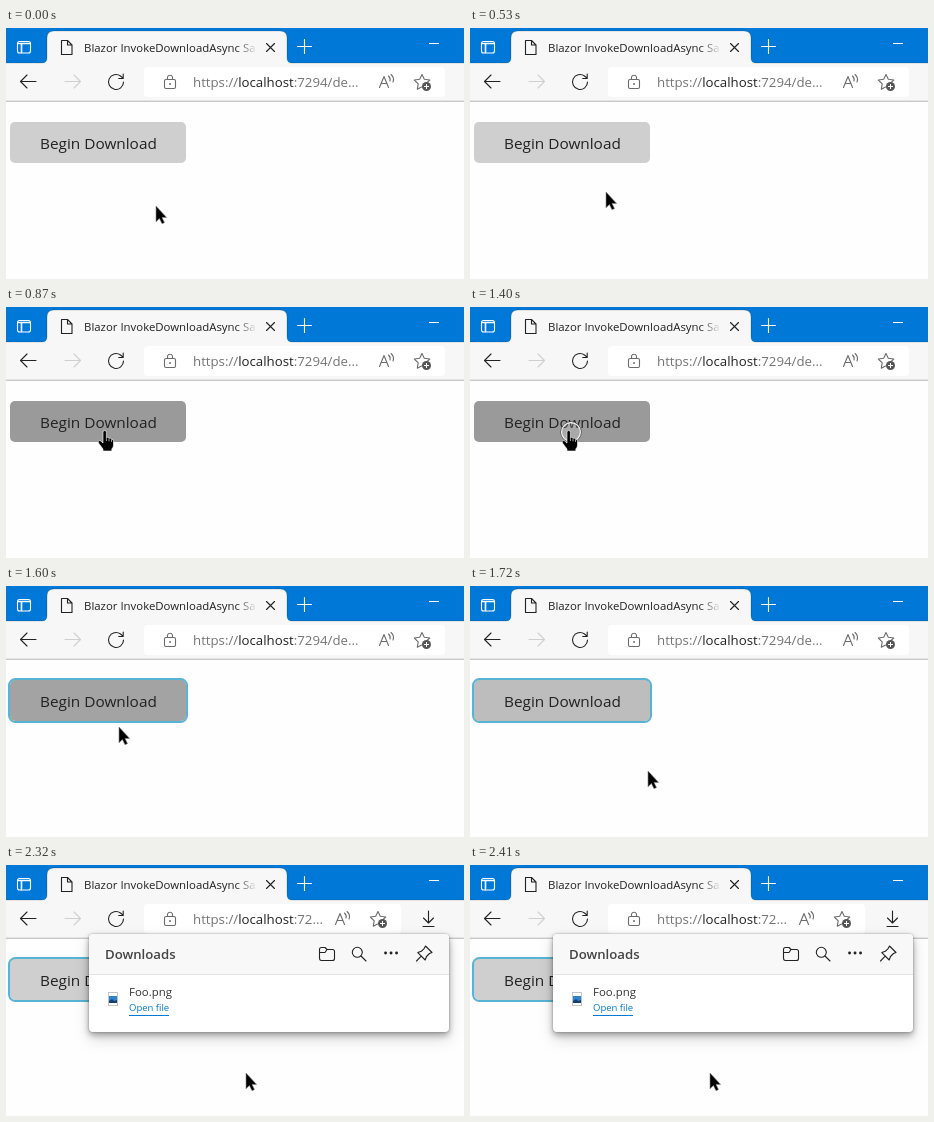
These frames come from a looping animation (458x251 px, 4340 ms). An HTML page:

```html
<!DOCTYPE html>
<html lang="en">
<head>
<meta charset="utf-8">
<title>Download demo</title>
<style>
html, body { margin: 0; width: 100%; height: 100%; overflow: hidden; background: #fefefe; }
svg { display: block; width: 458px; height: 251px; }
text { font-family: "Open Sans", "Noto Sans", sans-serif; fill: #222; white-space: pre; }
.line { fill: none; stroke: #222; stroke-width: 1.1; stroke-linecap: round; stroke-linejoin: round; }
.soft { stroke: #6b6b6b; }
.light { stroke: #fff; }
.pale { stroke: #cfcfcf; }
#panel { filter: drop-shadow(0 0 1px rgba(0,0,0,.3)) drop-shadow(0 3px 3px rgba(0,0,0,.3)) drop-shadow(0 6px 7px rgba(0,0,0,.15)); }
</style>
</head>
<body>
<svg viewBox="0 0 458 251">
  <defs>
    <linearGradient id="fade">
      <stop offset="0" stop-color="#f7f7f7" stop-opacity="0"/>
      <stop offset="1" stop-color="#f7f7f7"/>
    </linearGradient>
  </defs>
  <rect width="458" height="251" fill="#fefefe"/>

  <!-- Page -->
  <rect id="button" x="4" y="94" width="176" height="41" rx="5"/>
  <rect id="ring" x="3" y="93" width="178" height="43" rx="6.5" fill="none" stroke="#58b4d4" stroke-width="2"/>
  <text x="34" y="121" font-size="15.35">Begin Download</text>

  <!-- Title bar and toolbar -->
  <rect width="458" height="36" fill="#0078d7"/>
  <path d="M-2 35H36Q41 35 41 30V10Q41 3 48 3H274Q281 3 281 10V30Q281 35 286 35H460V73H-2Z" fill="#f7f7f7" stroke="#000" stroke-opacity=".16"/>
  <rect y="73" width="458" height="1" fill="#c8c8c8"/>
  <rect class="line light" x="11.5" y="13.5" width="13" height="11.5" rx="2"/>
  <path class="line light" d="M12 15.5H24M15.5 15.5V24.5" style="stroke-width:1.6"/>
  <path class="line" d="M55.5 12.5H61.5L66 17V26.5H55.5ZM61.5 12.5V17H66"/>
  <text x="78" y="23.5" font-size="11.4">Blazor InvokeDownloadAsync Sa</text>
  <rect x="230" y="8" width="21" height="22" fill="url(#fade)"/>
  <path class="line" d="M260.5 15.5L268.5 23.5M268.5 15.5L260.5 23.5"/>
  <path class="line light" d="M291.5 18.5H305.5M298.5 11.5V25.5"/>
  <path d="M423 15.5H433" stroke="#fff"/>

  <path class="line" d="M30 53.5H14.5M21 47L14.5 53.5L21 60"/>
  <path class="line pale" d="M59 53.5H74.5M68 47L74.5 53.5L68 60"/>
  <path class="line" d="M117.5 54A7.5 7.5 0 1 1 114.5 48L117 50.2M117.2 46V50.5H112.7"/>
  <rect id="field" x="138" y="39" height="30" rx="4" fill="#fff"/>
  <rect class="line soft" x="158.5" y="51.5" width="11" height="9" rx="1.5"/>
  <path class="line soft" d="M161.5 51V49.2A2.6 2.6 0 0 1 166.5 49.2V51"/>
  <circle cx="164" cy="56" r="1" fill="#6b6b6b"/>
  <text x="187" y="59" font-size="13.25" style="fill:#757575">https://<tspan fill="#222">localhost</tspan><tspan id="tail"></tspan></text>
  <g id="tools">
    <path class="line soft" d="M373.5 59.5L378 48.5L382.5 59.5M375 55.5H381M382.5 48Q384.8 50 384 53M385 46.5Q388.6 49.5 387 54"/>
    <path class="line soft" d="M416 46.5L418.3 51.2L423.8 52L419.8 55.7M416 46.5L413.7 51.2L408.3 52L412.2 55.8L411.3 61.2L415.5 59"/>
    <circle cx="420.5" cy="58.5" r="4.5" fill="#555"/>
    <path d="M418 58.5H423M420.5 56V61" stroke="#fff"/>
  </g>
  <path id="arrow" class="line" d="M422.5 46V58M417.5 53L422.5 58L427.5 53M417 61.5H428"/>

  <!-- Downloads flyout -->
  <g id="popup">
    <rect id="panel" x="83" y="69" width="360" rx="4" fill="#fff"/>
    <path d="M83 109V73Q83 69 87 69H439Q443 69 443 73V109Z" fill="#f8f8f8"/>
    <path d="M83 109.5H443" stroke="#e3e3e3"/>
    <text x="99" y="94" font-size="13.2" font-weight="600" style="fill:#444">Downloads</text>
    <path class="line" d="M313.5 93V84.5Q313.5 82.5 315.5 82.5H319L321 84.5H326.5Q328.5 84.5 328.5 86.5V93.5Q328.5 95.5 326.5 95.5H315.5Q313.5 95.5 313.5 93ZM314 87.5H319L321 84.5"/>
    <circle class="line" cx="351.3" cy="87.3" r="5"/>
    <path class="line" d="M355 91L360 96"/>
    <path class="line" d="M379.5 88H379.6M385 88H385.1M390.5 88H390.6" style="stroke-width:2.8"/>
    <path class="line" d="M419.5 81L426 87.5L423.5 88.5L420.5 91.5L419.2 95L411.8 87.6L415.3 86.3L418.3 83.3ZM415.2 91.2L410.5 96"/>
    <rect x="102.5" y="127.5" width="9" height="13" fill="#fff" stroke="#c4c4c4"/>
    <rect x="103" y="131" width="8" height="7" fill="#2f83d0"/>
    <path d="M103 138V136L106 134L108 136L111 135V138Z" fill="#173f70"/>
    <text x="123" y="131" font-size="11.4" style="fill:#333">Foo.png</text>
    <text x="123" y="146" font-size="9.5" style="fill:#0078d4">Open file</text>
    <path d="M123 150.5H163" stroke="#0078d4"/>
  </g>

  <!-- Pointer -->
  <g id="click">
    <circle cx="101" cy="125" r="10.3" fill="#fff" fill-opacity=".15" stroke="#444" stroke-width=".8"/>
    <circle cx="101" cy="125" r="9.4" fill="none" stroke="#f4f4f4" stroke-width="1.1"/>
  </g>
  <g id="pointer" stroke-linejoin="round">
    <path id="arrowTip" d="M0 0V15.8L3.4 12.4L6 17.8L8.5 16.6L6 11.4H10.6Z" stroke="#888" stroke-width=".6"/>
    <g id="hand" stroke="#fff" stroke-width=".6">
      <path d="M-2 1.2Q-2 -.5 -.3 -.5Q1.4 -.5 1.4 1.2V6.5Q3.3 5.6 4 7.2Q6 6.6 6.5 8.2Q8.5 8 8.5 10V14Q8.5 16.5 6.8 18V20H-2V18L-6.5 12Q-7.5 10.2 -5.8 9.5Q-4.6 9.2 -2 12Z"/>
      <path d="M1.4 6.5V10M4 7.4V10.4M6.5 8.4V11" fill="none"/>
    </g>
  </g>
</svg>
<script>
const LOOP = 4340;
const SLACK = 11;
const IDLE = 207, HOVER = 154;
const start = { x: 150, y: 178 };
const press = { x: 99, y: 124 };
const bend = { x: 136, y: 177 };
const rest = { x: 240, y: 208 };

const $ = id => document.getElementById(id);
const set = (id, attrs) => {
  for (const key in attrs) $(id).setAttribute(key, attrs[key]);
};
const show = (id, opacity) => set(id, { opacity: Number(opacity) });
const clamp = value => Math.max(0, Math.min(1, value));
const mix = (a, b, p) => a + (b - a) * p;
const mixPoint = (a, b, p) => ({ x: mix(a.x, b.x, p), y: mix(a.y, b.y, p) });
const easeOut = p => 1 - (1 - p) ** 2;

// 0 before `from`, then 1 to `count`, reaching `count` at `to`
function tick(time, from, to, count) {
  if (time < from) return 0;
  const length = (to - from) / (count - 1);
  return Math.min(count, 1 + Math.floor((time - from + SLACK) / length));
}

function drawPointer(time) {
  const approach = tick(time, 530, 870, 7);
  const leave = tick(time, 1400, 1840, 9);
  const away = clamp((leave - 3) / 6);

  const { x, y } = leave
    ? mixPoint(mixPoint(press, bend, away), mixPoint(bend, rest, away), away)
    : mixPoint(start, press, easeOut(approach / 7));
  const over = y < 135;
  const hover = leave ? 1 - away : clamp((approach - 4) / 3);
  const grey = Math.round(mix(IDLE, HOVER, hover));

  set('pointer', { transform: `translate(${Math.round(x)} ${Math.round(y)})` });
  show('hand', over);
  show('arrowTip', !over);
  set('button', { fill: `rgb(${grey},${grey},${grey})` });
  show('ring', leave > 1);
  show('click', leave > 0 && leave < 4);
}

function drawBrowser(time) {
  const step = tick(time, 2140, 2410, 7);
  const shift = Math.min(44, 27 * step);
  const flyout = clamp((step - 2) / 3);

  set('field', { width: 301 - shift });
  set('tools', { transform: `translate(${-shift} 0)` });
  $('tail').textContent = ':7294/de'.slice(0, 8 - Math.round(shift / 9)) + '...';
  show('arrow', clamp((step - 1) / 2));
  show('popup', flyout);
  set('panel', { height: mix(142, 98, flyout) });
}

function draw() {
  const time = performance.now() % LOOP;
  drawPointer(time);
  drawBrowser(time);
  requestAnimationFrame(draw);
}
draw();
</script>
</body>
</html>
```
